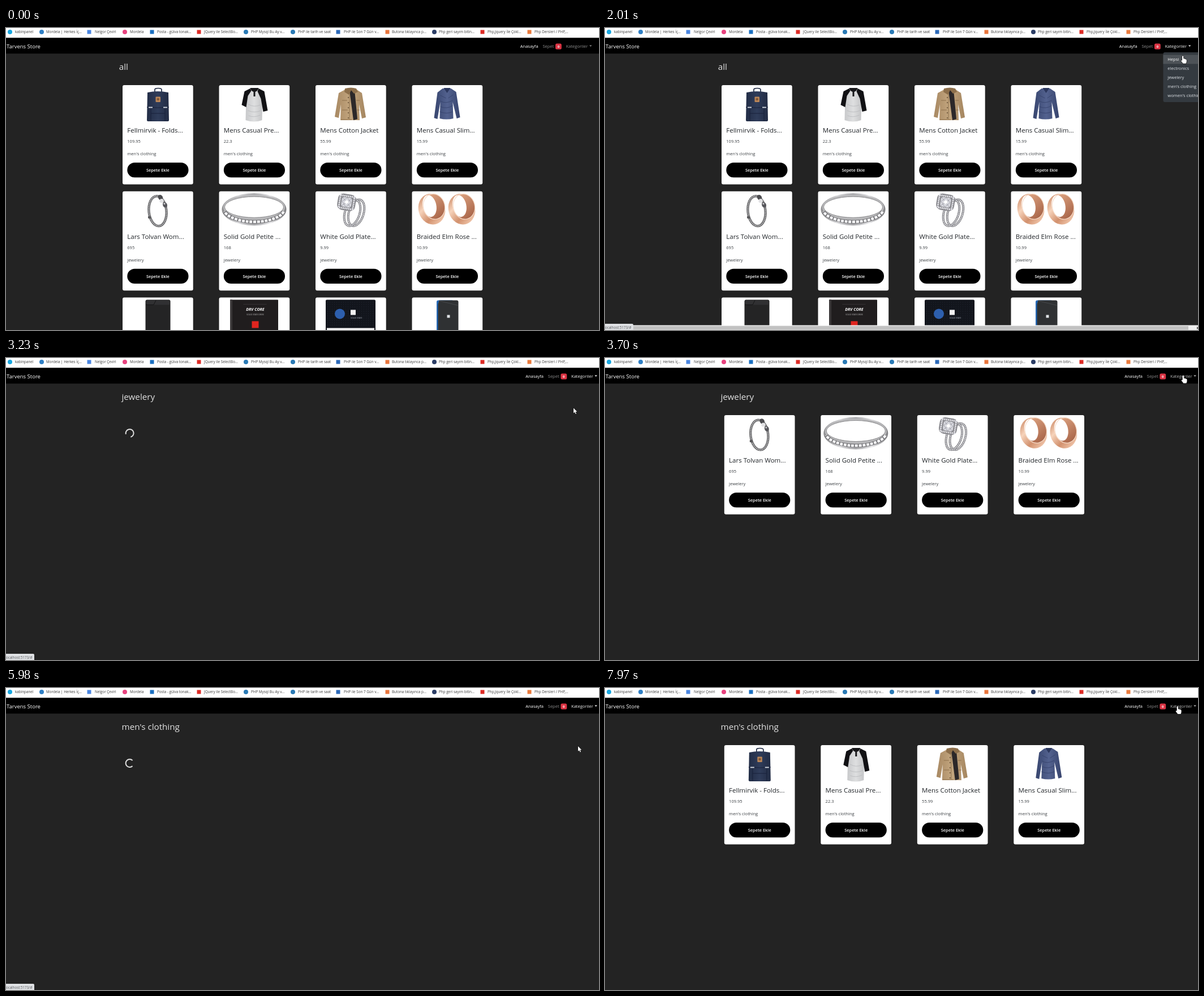
Recreate the animation shown at these times as an HTML page with a canvas. Size 1048x534 px, loop 8 s.

```html
<!DOCTYPE html>
<html lang="tr">
<head>
<meta charset="utf-8">
<title>Store</title>
<style>
html, body { margin: 0; width: 100%; height: 100%; overflow: hidden; background: #232323; }
canvas { display: block; }
</style>
</head>
<body>
<canvas id="stage" width="1048" height="534"></canvas>
<script>
const ctx = document.getElementById('stage').getContext('2d');
const W = 1048, H = 534, LOOP = 8000;
const FAMILY = '"Open Sans", "Noto Sans", sans-serif';

// ---------- drawing helpers ----------
function rect(color, x, y, w, h, r = 0) {
  ctx.fillStyle = color;
  ctx.beginPath();
  ctx.roundRect(x, y, w, h, r);
  ctx.fill();
}
function oval(color, x, y, rx, ry = rx, turn = 0) {
  ctx.fillStyle = color;
  ctx.beginPath();
  ctx.ellipse(x, y, rx, ry, turn, 0, 7);
  ctx.fill();
}
function hoop(color, width, x, y, rx, ry, turn = 0, dash = [], from = 0, to = 2 * Math.PI) {
  ctx.strokeStyle = color;
  ctx.lineWidth = width;
  ctx.setLineDash(dash);
  ctx.beginPath();
  ctx.ellipse(x, y, rx, ry, turn, from, to);
  ctx.stroke();
  ctx.setLineDash([]);
}
function fill(color, d) {
  ctx.fillStyle = color;
  ctx.fill(new Path2D(d));
}
function line(color, width, d) {
  ctx.strokeStyle = color;
  ctx.lineWidth = width;
  ctx.stroke(new Path2D(d));
}
function text(str, x, y, size, color, weight = 400, align = 'left') {
  ctx.font = `${weight} ${size}px ${FAMILY}`;
  ctx.fillStyle = color;
  ctx.textAlign = align;
  ctx.fillText(str, x, y);
}
function sheen(x0, y0, x1, y1, ...colors) {
  const g = ctx.createLinearGradient(x0, y0, x1, y1);
  colors.forEach((c, i) => g.addColorStop(i / (colors.length - 1), c));
  return g;
}

// ---------- product pictures, in card coordinates ----------
function backpack() {
  line('#1d2740', 1.7, 'M57 12V8q0-2.500 6-2.500t6 2.500v4');
  fill(sheen(43, 0, 82, 0, '#222d46', '#2f3c5a', '#222c44'),
    'M44 13q18-4 37 0l1 49q0 2-3 2H46q-3 0-3-2Z');
  line('#18213a', 1, 'M43 39q19 2 39 0M50 42v21M75 42v21M50 50h25');
  rect('#b98558', 58.500, 20.500, 8.500, 9.500, 1);
  oval('#7f5636', 62.700, 25, 2.300);
  rect('#d5dae2', 46, 38.500, 7, 1.800);
  rect('#d5dae2', 72, 38.500, 7, 1.800);
}
function raglan() {
  fill(sheen(46, 0, 78, 0, '#c6c7c9', '#dedfe0', '#c2c3c5'),
    'M54 7h17l6 11-1 44q-14 5-29 0l1-44Z');
  fill('#111114', 'M55 6l-10 5-5 24 8 4 3-20 6-9Z');
  fill('#111114', 'M70 6l10 5 6 34-8 2-4-23-6-13Z');
  fill('#17171a', 'M55 5h15q-2 7-7.500 7T55 5Z');
  rect('#17171a', 61, 10, 3, 10);
  line('#b4b5b8', .7, 'M52 34q10 6 21 1M51 45q12 5 23 0M52 54q10 4 21-1');
}
function jacket() {
  fill(sheen(36, 0, 88, 0, '#a98a64', '#c3a67f', '#a58660'),
    'M52 8h21l9 6 7 43-7 2-5-25 1 28H44l1-28-4 24-7-2 7-42Z');
  fill('#2c2829', 'M60 9l9-1 5 52-7 2Z');
  fill('#8d6f4b', 'M52 6q11-3 20 0l3 6-7 3-5-6-4 8-8-5Z');
  line('#8a6d49', .9, 'M60 14v46M47 27h9M47 44h10M72 27h6M73 44h5M45 61h19');
  for (let y = 22; y < 60; y += 9) oval('#5c4630', 58, y, .9);
}
function sweater() {
  fill(sheen(40, 0, 85, 0, '#38466f', '#53628f', '#37446d'),
    'M54 6h15l9 6 7 45-6 2-7-29 1 29q-12 3-24 0l1-29-5 30-6-2 6-45Z');
  fill('#2c385e', 'M56 5h12l-6 9Z');
  line('#34416a', .8, 'M50 28q9 6 22-1M50 38q12 5 22-2M49 47q12 5 23 0M50 18l10 5M73 17l-9 6');
}
function bracelet() {
  hoop('#6c6c6e', 4.400, 62, 35, 15.500, 26.500, -.1);
  hoop('#c4c4c6', 2, 62, 35, 15.500, 26.500, -.1, [1.500, 1.400]);
  oval('#4d4d50', 67, 11, 4, 5, -.5);
  oval('#e2e2e4', 69, 17, 3.600);
  oval('#55555a', 75, 24, 3.800, 5, -.4);
  oval('#c9c9cc', 74, 22, 1.600);
  rect('#58585a', 45, 44, 5, 4, 1);
}
function band() {
  oval(sheen(5, 0, 119, 0, '#8b8b8d', '#d9d9db', '#a5a5a8', '#e6e6e8', '#7f7f82'), 62, 32, 57, 28.500);
  oval('#b9b9bb', 62, 28.500, 54.500, 22.500);
  oval('#fff', 62, 28, 52, 18.500);
  hoop('#777779', .8, 62, 28, 52, 18.500);
  hoop('#6f6f72', 6.500, 62, 30, 54, 24, 0, [], .25, 2.900);
  hoop('#f4f4f6', 4.600, 62, 30, 54, 24, 0, [5, 1.700], .25, 2.900);
}
function solitaire() {
  for (const dx of [4, -3]) {
    hoop('#858589', 4, 68 + dx, 38, 13, 24, .3);
    hoop('#dcdce0', 2, 68 + dx, 38, 13, 24, .3, [2, 1]);
  }
  ctx.save();
  ctx.translate(55, 19);
  ctx.rotate(.16);
  rect('#86868b', -16, -14, 32, 29, 9);
  ctx.strokeStyle = '#e9e9ee';
  ctx.lineWidth = 3;
  ctx.setLineDash([2.200, 1.100]);
  ctx.strokeRect(-12.500, -10.500, 25, 22);
  ctx.setLineDash([]);
  rect('#d9dae0', -9, -8, 18, 17, 4);
  line('#9a9ba3', .8, 'M-9-8L9 9M9-8L-9 9M0-8L8 0 0 9-8 0Z');
  oval('#fff', 0, 0, 3);
  ctx.restore();
}
function roseRings() {
  for (const x of [10, 63]) {
    const glow = sheen(x, 10, x + 48, 50, '#c98560', '#f6d3bb', '#d2916e', '#f3c9ae');
    oval(glow, x + 25, 31.500, 23.500, 27.500, -.28);
    oval(sheen(x + 20, 8, x + 48, 40, '#dba17f', '#a9664a'), x + 29, 27, 19, 22.500, -.25);
    oval('#fff', x + 21, 26, 12, 19.500, -.2);
    hoop('#f7dcc9', 1.200, x + 29, 27, 19, 22.500, -.25);
  }
}
function hardDrive() {
  rect('#242425', 40.500, 4, 44, 60, 3);
  rect('#303032', 42, 5, 41, 8, 2);
  line('#151516', 1, 'M41 13h14l4-8');
}
function solidDrive() {
  rect('#201d1e', 19.500, 4, 85, 60, 1);
  rect('#3a3738', 19.500, 4, 4, 60);
  rect('#4a4748', 43, 12, 41, .6);
  text('DRV CORE', 64, 24, 7, '#fff', 'italic 700', 'center');
  text('SOLID STATE DRIVE', 64, 32, 3.500, '#b9b9b9', 400, 'center');
  rect('#e0251f', 58, 42, 12, 12);
}
function patternDrive() {
  rect('#12151c', 18, 4, 88, 60, 2);
  for (let y = 8; y < 50; y += 4)
    for (let x = 21; x < 104; x += 4) rect('#232833', x, y, 1, 1);
  oval('#2d5fae', 43, 29, 9);
  rect('#f2f2f2', 62, 22, 9, 9);
  text('SOLID STATE', 62, 38, 3.500, '#aeb4c0');
  rect('#f4f4f4', 20, 54, 84, 10);
}
function portableDrive() {
  rect('#2366b4', 43.500, 5, 30, 60, 3);
  fill('#2f3133', 'M48 5h31q3 0 3 3v56H46V12Z');
  line('#46494c', 1, 'M48 6l33 8');
  rect('#dfe3e6', 62, 31, 5, 5);
}

const MEN = "men's clothing", JEWEL = 'jewelery', TECH = 'electronics';
const products = [
  ['Fellmirvik - Folds...', '109.95', MEN, backpack],
  ['Mens Casual Pre...', '22.3', MEN, raglan],
  ['Mens Cotton Jacket', '55.99', MEN, jacket],
  ['Mens Casual Slim...', '15.99', MEN, sweater],
  ['Lars Tolvan Wom...', '695', JEWEL, bracelet],
  ['Solid Gold Petite ...', '168', JEWEL, band],
  ['White Gold Plate...', '9.99', JEWEL, solitaire],
  ['Braided Elm Rose ...', '10.99', JEWEL, roseRings],
  ['', '', TECH, hardDrive],
  ['', '', TECH, solidDrive],
  ['', '', TECH, patternDrive],
  ['', '', TECH, portableDrive],
];

function card([title, price, category, picture], x, y) {
  ctx.save();
  ctx.translate(x, y);
  rect('#fff', 0, 0, 124.700, 175.500, 3);
  picture();
  text(title, 8.300, 84.300, 11.500, '#212529', 500);
  text(price, 8.300, 101.900, 7.500, '#3c4044');
  text(category, 8.300, 124.200, 7.600, '#3c4044');
  rect('#000', 8.300, 137, 108.200, 26.300, 13.100);
  text('Sepete Ekle', 62.400, 152.900, 7.400, '#fff', 600, 'center');
  ctx.restore();
}

// ---------- browser chrome ----------
// icon x, shape, colour, label x, label
const bookmarks = [
  [7, 'o', '#19a7e0', 16, 'kabinpanel'],
  [63, 'o', '#2f7fc4', 71, 'Mordela | Herkes İç...'],
  [147, 's', '#4a86e0', 157, 'Nelgor Çeviri'],
  [210, 'o', '#e8437f', 219, 'Mordela'],
  [258, 's', '#1a6fc0', 267, 'Posta - gülva tonak...'],
  [341, 's', '#dd2b25', 350, 'JQuery ile SelectBo...'],
  [424, 'o', '#2a7ab5', 433, 'PHP Mysql Bu Ay v...'],
  [507, 'o', '#2a7ab5', 516, 'PHP ile tarih ve saat'],
  [587, 's', '#2b68b8', 597, 'PHP ile Son 7 Gün v...'],
  [674, 's', '#e8743b', 682, 'Butona tıklayınca p...'],
  [757, 'o', '#2c3e66', 765, 'Php geri sayım bitin...'],
  [842, 's', '#dd2b25', 851, 'Php,Jquery İle Çokl...'],
  [925, 's', '#ea7a3c', 934, 'Php Dersleri / PHP,...'],
];
function bookmarkBar() {
  rect('#fff', 0, 0, W, 17.500);
  for (const [x, shape, color, labelX, label] of bookmarks) {
    if (shape === 'o') oval(color, x, 7, 4);
    else rect(color, x - 3.500, 3.500, 7, 7);
    text(label, labelX, 9.300, 6.300, '#3b3b3b');
  }
}

function statusBubble(t) {
  const shown = (t >= 930 && t < 3240) || (t >= 3890 && t < 6050);
  if (!shown) return;
  const onItem = (t >= 1800 && t < 3240) || t >= 5030;
  ctx.globalAlpha = t < 1000 || (t >= 3890 && t < 3950) ? .5 : 1;
  rect('#dfe1e4', -3, 523, onItem ? 53 : 46, 14, 2);
  text('localhost:5173' + (onItem ? '/#' : ''), -1.600, 531.500, 6.200, '#55585c');
  ctx.globalAlpha = 1;
}

function scrollbar() {
  rect('#efefef', 0, 525.500, W, 9);
  rect('#c1c1c1', 0, 527, 1031, 6.500);
  fill('#505050', 'M1046 528l3 2.500-3 2.500Z');
}

// ---------- pointer ----------
// start, end, number of positions, way points
const moves = [
  [110, 870, 12, [[1027, 505], [1003, 316], [990, 160], [1019, 30]]],
  [1670, 2430, 12, [[1019, 30], [1021, 52], [1014, 78], [1003, 89]]],
  [2490, 2491, 2, [[1003, 89], [1003, 88.500]]],
  [3245, 3830, 9, [[1003, 88.500], [1014, 55], [1022, 32], [1021, 31]]],
  [4890, 5590, 11, [[1021, 31], [1017, 97], [1014, 107], [1011, 103]]],
  [6050, 6570, 9, [[1011, 103], [900, 150], [728, 185]]],
  [6950, 7690, 12, [[728, 185], [800, 150], [900, 70], [956, 30]]],
  [7760, 7970, 4, [[957, 31], [1011.500, 33]]],
];
function pointerAt(t) {
  const move = moves.findLast(m => t >= m[0]);
  if (!move) return null;
  const [start, end, count, path] = move;
  const u = Math.min(1, Math.floor((t - start) / (end - start) * (count - 1) + 1e-6) / (count - 1));
  const s = u * u * (3 - 2 * u) * (path.length - 1);
  const i = Math.min(path.length - 2, Math.floor(s));
  const mix = k => path[i][k] + (path[i + 1][k] - path[i][k]) * (s - i);
  return { x: mix(0), y: mix(1) };
}
function drawPointer({ x, y }, hand) {
  ctx.save();
  ctx.translate(x, y);
  const d = hand
    ? 'M-.8 0Q.5-1.300 1.500 0V4.500Q3 3.800 3.600 5 5 4.500 5.500 5.600 7 5.400 7 7V9.500Q7 11 5.800 13H.8L-2.600 8.600Q-3 6.800-.8 7.600Z'
    : 'M0 0V9L2.100 7.100 3.700 10.400 5 9.800 3.500 6.600H6.300Z';
  line('#1a1a1a', 1.300, d);
  fill('#fff', d);
  ctx.restore();
}

// ---------- page ----------
const entries = ['Hepsi', TECH, JEWEL, MEN, "women's clothing"];
function menu(pointer, pressed) {
  rect('#343a40', 986.500, 43, 70, 88, 3);
  const hovered = pointer.y > 48 ? Math.floor((pointer.y - 2 - 47.500) / 16) : -1;
  entries.forEach((label, i) => {
    const y = 47.500 + 16 * i;
    if (i === hovered) rect(pressed ? '#0d6efd' : '#4d5257', 986.500, y, 62, 16);
    text(label, 994.300, y + 10.700, 7.550, i === hovered ? '#fff' : '#dee2e6');
  });
}

function navbar(shift, pointer, open, loading) {
  const over = (a, b) => pointer && pointer.y > 22 && pointer.y < 42 &&
    pointer.x >= a + shift && pointer.x < b + shift;
  const tint = hot => hot ? '#b8b8b8' : '#8c8c8c';
  rect('#000', 0, 17.500, W, 27.700);
  text('Tarvens Store', 1, 35.500, 9.500, '#fff', 500);
  ctx.save();
  ctx.translate(shift, 0);
  text('Anasayfa', 908.800, 34.600, 7.500, '#fff');
  text('Sepet', 948.400, 34.600, 7.500, tint(over(945, 984)));
  rect('#dc3545', 971, 27.500, 10.800, 10.300, 2.500);
  text('0', 976.400, 34.900, 6, '#fff', 700, 'center');
  const color = open || loading ? '#f4f4f4' : tint(over(986, 1040));
  text('Kategoriler', 989.700, 34.600, 7.500, color);
  fill(color, 'M1031 30.500h4.400l-2.200 2.400Z');
  ctx.restore();
  return over(905, 1040);
}

const between = (t, a, b) => t >= a && t < b;

function draw(t) {
  const open = between(t, 1273, 3103) || between(t, 4520, 5915);
  const pressed = between(t, 3030, 3103) || between(t, 5850, 5915);
  const clicked = pressed || between(t, 1210, 1337) || between(t, 4430, 4610);
  const loading = between(t, 3103, 3440) || between(t, 5915, 6245);
  const page = t < 3103 ? 'all' : t < 5915 ? JEWEL : MEN;
  const narrow = page === 'all' || open;
  const left = narrow ? 206 : 210.800;
  const pointer = pointerAt(t);

  rect('#232323', 0, 0, W, H);
  bookmarkBar();
  const onLink = navbar(narrow ? 0 : 9.400, pointer, open, loading);
  text(page, left - 6.300, 73.700, 15.200, '#e2e2e2', 500);

  if (loading) {
    const turn = (t - 5980) / 750 * 2 * Math.PI;
    hoop('#dedede', 2, left + 7.800, 133, 7, 7, turn, [], Math.PI / 4, Math.PI * 7 / 4);
  } else {
    products.filter(p => page === 'all' || p[2] === page).forEach((p, i) =>
      card(p, left + 170.500 * (i % 4), 101 + 187.700 * Math.floor(i / 4)));
  }

  if (open) {
    menu(pointer, pressed);
    scrollbar();
  }
  statusBubble(t);
  if (!pointer) return;
  if (clicked) oval('rgba(226,214,20,.68)', pointer.x + .5, pointer.y + 1, 6.500);
  drawPointer(pointer, onLink || (open && pointer.x > 986 && pointer.y < 131));
}

const begin = performance.now();
function tick() {
  draw((performance.now() - begin) % LOOP);
  requestAnimationFrame(tick);
}
tick();
</script>
</body>
</html>
```
